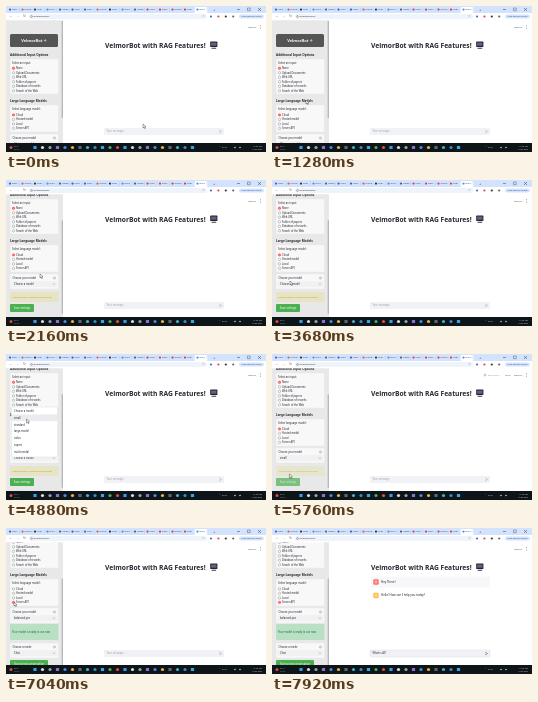
An HTML page with a canvas that plays this animation: 260x146 px, repeating every 8 s.

```html
<!DOCTYPE html>
<html lang="en">
<head>
<meta charset="utf-8">
<style>
  html, body { margin: 0; width: 100%; height: 100%; overflow: hidden; background: #fff; }
  canvas { display: block; width: 260px; height: 146px; }
</style>
</head>
<body>
<canvas id="stage"></canvas>
<script>
const W = 260, H = 146, LOOP = 8000, STEP = 80;
const canvas = document.getElementById('stage');
const ratio = window.devicePixelRatio || 1;
canvas.width = W * ratio;
canvas.height = H * ratio;
const c = canvas.getContext('2d');
c.scale(ratio, ratio);
c.textBaseline = 'middle';

const INK = '#262730', PANEL = '#f8f8f8', RED = '#ff4b4b';

function box(x, y, w, h, fill, r = 0, stroke) {
  c.beginPath();
  c.roundRect(x, y, w, h, r);
  if (fill) { c.fillStyle = fill; c.fill(); }
  if (stroke) { c.strokeStyle = stroke; c.lineWidth = .4; c.stroke(); }
}
function dot(x, y, r, fill, stroke) {
  c.beginPath();
  c.arc(x, y, r, 0, 7);
  if (fill) { c.fillStyle = fill; c.fill(); }
  if (stroke) { c.strokeStyle = stroke; c.lineWidth = .5; c.stroke(); }
}
function text(s, x, y, size = 2.6, fill = INK, weight = 400, align = 'left') {
  c.font = `${weight} ${size}px "Noto Sans", sans-serif`;
  c.textAlign = align;
  c.fillStyle = fill;
  c.fillText(s, x, y);
}
function line(color, width, ...points) {
  c.beginPath();
  points.forEach(([x, y]) => c.lineTo(x, y));
  c.strokeStyle = color;
  c.lineWidth = width;
  c.stroke();
}

// Eased value at t between [time, ...values] keys
function track(keys, t) {
  const next = keys.findIndex(k => k[0] > t);
  if (next < 0) return keys[keys.length - 1].slice(1);
  if (next === 0) return keys[0].slice(1);
  const a = keys[next - 1], b = keys[next];
  const p = (t - a[0]) / (b[0] - a[0]), e = p * p * (3 - 2 * p);
  return a.slice(1).map((v, i) => v + (b[i + 1] - v) * e);
}
const within = (t, from, to) => t >= from && t < to;

const scrollKeys = [[1360, 0], [2000, 34], [6800, 34], [7040, 48]];
const pointerKeys = [
  [0, 137, 118], [640, 137, 118], [1280, 34, 94], [2240, 34, 94], [2800, 19, 104],
  [2880, 19, 104], [3280, 30, 112], [3680, 18, 101], [3920, 20, 103], [4160, 20, 103],
  [4800, 20.5, 65], [5200, 20.5, 65], [5920, 17, 128], [6560, 17, 128], [6880, 8, 87],
  [7040, 8, 74], [7200, 8, 74], [7440, 183, 134], [7520, 183, 134], [7600, 111, 125]
];

function browser() {
  box(0, 0, W, 7, '#d3e3fd');
  const icons = ['#3d62b8', '#e15b4f', '#30343b', '#4f92db', '#56606c', '#3f5fb5'];
  for (let i = 0; i < 16; i++) {
    const x = 4 + i * 12.5;
    if (i === 15) box(x - 3, 1, 13, 6, '#fff', 1.5);
    dot(x, 3.6, 1.1, i > 10 && i < 15 ? '#e33b3b' : icons[i % 6]);
    text(['Docs', 'Home', 'Chat'][i % 3], x + 2, 3.6, 2.3, '#2f3a4a');
    line('#9eb4d4', .3, [x + 9.5, 2], [x + 9.5, 5.2]);
  }
  text('+', 207, 3.5, 4, '#46556a');
  line('#333d4a', .5, [231, 3.5], [234, 3.5]);
  box(241.5, 2, 2.7, 2.7, null, 0, '#333d4a');
  line('#333d4a', .5, [252, 2], [255, 5]);
  line('#333d4a', .5, [255, 2], [252, 5]);

  box(0, 7, W, 7.2, '#fff');
  text('←', 3, 10.4, 3.6, '#555');
  text('→', 10, 10.4, 3.6, '#999');
  text('↻', 17, 10.4, 3.6, '#555');
  box(23, 8, 178, 5, '#eff3fa', 2.5);
  dot(25.5, 10.5, .9, null, '#666');
  text('localhost:8501', 27.5, 10.5, 2.4, '#222');
  text('☆', 196, 10.4, 3.2, '#555');
  ['#446bc0', '#d84841', '#333', '#666'].forEach((color, i) =>
    dot(205 + i * 7.4, 10.5, 1.1, color));
  box(233, 8.4, 25, 4.2, '#d3e3fd', 2.1);
  text('New version ready', 245.5, 10.5, 2.3, '#244b84', 400, 'center');
}

function taskbar() {
  box(0, 137, W, 9, '#0e1519');
  dot(5, 141.6, 1.5, '#dc4c42');
  text('27°C', 8, 140.3, 2, '#ccc');
  text('Sunny', 8, 143.5, 1.9, '#888');
  const colors = ['#3b9be6', '#ddd', '#8fa4b8', '#8d6fd1', '#4a8be0', '#e8b44c', '#5b666e',
                  '#3fb3c9', '#2d8fd8', '#3aa6e8', '#4cae62', '#d9503f'];
  for (let i = 0; i < 22; i++) {
    const x = 29 + i * 7.5, color = colors[i % colors.length];
    if (i % 3) dot(x, 141.5, 1.6, color);
    else box(x - 1.6, 139.9, 3.2, 3.2, color, .5);
  }
  text('⌃  ENG', 213, 141.5, 2.3, '#ccc');
  dot(229, 141.5, .8, '#ccc');
  dot(234, 141.5, .8, '#ccc');
  text('11:42 AM', 256, 140.2, 2.1, '#ddd', 400, 'right');
  text('14-04-2024', 256, 143.5, 1.9, '#ddd', 400, 'right');
}

function radios(labels, y, selected) {
  labels.forEach((label, i) => {
    const cy = y + i * 4.5;
    const on = i === selected;
    dot(7.5, cy, 1.2, on ? RED : '#fff', on ? RED : '#888');
    if (on) dot(7.5, cy, .45, '#fff');
    text(label, 10, cy);
  });
}
function selectCard(y, label, value) {
  box(4, y, 48.5, 15, PANEL, 1.2, '#e2e2e4');
  text(label, 6.5, y + 4.3);
  dot(48.5, y + 4, 1, null, '#888');
  box(5.5, y + 7.2, 45.5, 6, '#f0f1f3', 1);
  text(value, 8, y + 10.3);
  line('#666', .4, [47, y + 9.7], [48, y + 10.7], [49, y + 9.7]);
}

function sidebar(t, scroll) {
  c.save();
  c.beginPath();
  c.rect(0, 14, 57, 123);
  c.clip();
  box(0, 14, 57, 123, '#e8e8e8');
  c.translate(0, -scroll);

  box(4, 28, 48, 13, '#555', 1.5);
  text('VelmorBot ✧', 28, 34.7, 4, '#fff', 600, 'center');
  text('Additional Input Options', 4, 48.7, 3.1, INK, 700);
  box(4, 53, 48.5, 35, PANEL, 1.2, '#e2e2e4');
  text('Select an input:', 6, 57.5);
  radios(['None', 'Upload Documents', 'Web URL', 'Folder of papers',
          'Database of records', 'Search of the Web'], 62.3, t < 7040 ? 0 : -1);

  text('Large Language Models', 4, 95.2, 3.1, INK, 700);
  box(4, 99, 48.5, 27, PANEL, 1.2, '#e2e2e4');
  text('Select language model:', 6, 103.7);
  radios(['Cloud', 'Hosted model', 'Local', 'Server API'], 108.9, t < 6960 ? 0 : 3);

  const open = within(t, 4160, 5280);
  selectCard(128, 'Choose your model', t < 5280 ? 'Choose a model' : t < 6960 ? 'small' : 'balanced-pro');

  const ready = t >= 6880;
  c.globalAlpha = within(t, 5760, 6560) ? .7 : 1;
  if (ready) {
    box(4, 144, 48.5, 16, '#b9dfc5', 1.2);
    text('Your model is ready to use now', 6, 152, 2.6, '#177233');
    selectCard(163, 'Choose a mode', 'Chat');
    box(4, 180, 38, 8, '#4caf50', 1);
    text('Start a new conversation', 23, 184, 2.6, '#fff', 400, 'center');
  } else {
    box(4, 146, 48.5, 10, '#e6e4c4', 1.2);
    text('Please select a model to continue', 6.5, 151.2, 2.5, '#b3952f');
    box(4, 158, 24, 8, '#4caf50', 1);
    text('Save settings', 16, 162, 2.7, '#fff', 400, 'center');
  }
  c.globalAlpha = 1;

  if (open) {
    box(5.5, 87, 46, 50, '#fff', 1.2, '#d2d4d9');
    const hover = t >= 4720 ? 1 : 0;
    ['Choose a model', 'small', 'standard', 'large-model', 'turbo', 'expert', 'multi-modal'].forEach((item, i) => {
      const y = 91 + i * 6.8;
      if (i === hover) box(6, y - 3.2, 45, 6.4, '#e9ebef');
      text(item, 8, y + .2);
    });
  }
  c.restore();
  box(55.7, 15 + scroll * .74, 1.1, 97 - scroll * .1, '#a9abb0', .5);
}

function message(y, color, words, shaded) {
  if (shaded) box(99, y - 5.5, 119, 11, '#f7f7f9', 1.5);
  box(101.3, y - 2.7, 5.4, 5.4, color, 1.2);
  dot(104, y, 1.1, null, '#fff');
  text(words, 109, y, 2.9);
}

function page(t) {
  box(57, 14.2, 203, 122.8, '#fff');
  text('Deploy', 242, 21, 2.5, '#555');
  [19.7, 21, 22.3].forEach(y => dot(254.5, y, .35, INK));
  if (within(t, 5600, 6640) || within(t, 7200, 7440)) {
    dot(213, 21, 1, null, '#888');
    text('RUNNING...', 216, 21, 2.3, '#888');
    text('Stop', 233, 21, 2.5, '#555');
  }
  text('VelmorBot with RAG Features!', 99, 39.6, 6.7, INK, 700);
  box(204.2, 35.5, 7.2, 5.6, '#23242a', .7);
  box(205.1, 36.5, 5.4, 3.3, '#625f86', .3);
  box(205.5, 41.8, 4.7, 1, '#3a3b42', .3);

  if (t >= 7280) message(54, '#ff6c6c', 'Hey There!', true);
  if (t >= 7440) message(67.5, '#ffbd45', 'Hello! How can I help you today?');

  const typed = t >= 7600;
  box(98, 122, 120, 7, '#f0f2f6', 1.3, typed ? '#d1d4dc' : null);
  text(typed ? 'What is AI?' : 'Your message', 100.5, 125.5, 2.6, typed ? INK : '#a3a5ad');
  line(typed ? '#555' : '#aaa', .6, [213.2, 124.2], [215.5, 125.5], [213.2, 126.8]);
}

function pointer(t) {
  const [x, y] = track(pointerKeys, t);
  if (t >= 7600) {
    if (t < 7920) line('#333', .4, [x + .5, y - 1], [x + .5, y + 1.5]);
    return;
  }
  c.beginPath();
  [[0, 0], [0, 4], [1, 3.1], [1.7, 4.6], [2.3, 4.3], [1.7, 2.9], [3, 2.8]].forEach(([dx, dy]) =>
    c.lineTo(x + dx, y + dy));
  c.closePath();
  c.fillStyle = '#fff';
  c.fill();
  c.strokeStyle = '#222';
  c.lineWidth = .4;
  c.stroke();
}

function draw(now) {
  const t = Math.floor(now % LOOP / STEP) * STEP;
  page(t);
  sidebar(t, track(scrollKeys, t)[0]);
  browser();
  taskbar();
  pointer(t);
  requestAnimationFrame(draw);
}
requestAnimationFrame(draw);
</script>
</body>
</html>
```
